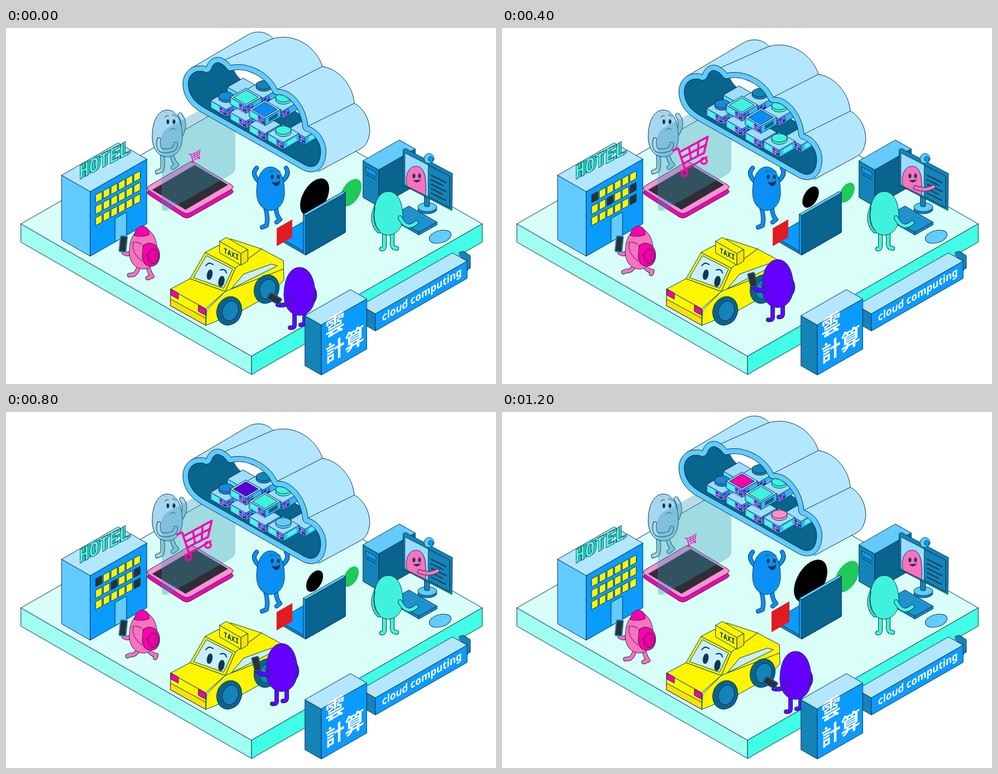
An HTML page for the animation above (1.4 s loop, 878 by 638 pixels).

```html
<!DOCTYPE html>
<html lang="en">
<head>
<meta charset="utf-8">
<title>Cloud computing</title>
<style>
html, body { margin: 0; width: 100%; height: 100%; overflow: hidden; background: #fff; }
svg { display: block; width: 878px; height: 638px; }
</style>
</head>
<body>
<svg id="stage" viewBox="0 0 878 638" stroke-linejoin="round" stroke-linecap="round"></svg>
<script>
const INK = '#063a52', SKY = '#b3e6ff', AQUA = '#62cbff', BLUE = '#0a9bff', MID = '#1583b8',
  DEEP = '#09648e', MINT = '#40ffe6', TEAL = '#40f2dd', HOT = '#ff00aa', PINK = '#ff70bf',
  VIOLET = '#6400ff', YELLOW = '#fff500', GOLD = '#ffe000', DARK = '#302e33',
  MONO = "'DejaVu Sans Mono', monospace", SLOPE = .574;

// drawing helpers
const path = (d, fill = 'none', more = '') => `<path d="${d}" fill="${fill}" stroke="${INK}" ${more}/>`;
const poly = (pts, fill) => `<polygon points="${pts}" fill="${fill}" stroke="${INK}"/>`;
const oval = (x, y, rx, ry, fill, turn = 0) =>
  `<ellipse rx="${rx}" ry="${ry}" transform="translate(${x} ${y}) rotate(${turn})" fill="${fill}" stroke="${INK}"/>`;
const bare = (x, y, w, h, fill) => `<rect x="${x}" y="${y}" width="${w}" height="${h}" fill="${fill}"/>`;
const group = (inner, more = '') => `<g ${more}>${inner}</g>`;
const iso = (x, y, inner, slope = -.51, wide = .87) =>
  group(inner, `transform="matrix(${wide} ${slope} 0 1 ${x} ${y})"`);
const limb = (d, color, id = '', w = 6) =>
  `<path class="${id}" d="${d}" fill="none" stroke="${INK}" stroke-width="${w + 2}"/>` +
  `<path class="${id}" d="${d}" fill="none" stroke="${color}" stroke-width="${w}"/>`;
const egg = (x, y, rx, ry, fill) => path(
  `M${x - rx},${y + ry * .15} C${x - rx},${y - ry * .55} ${x - rx * .6},${y - ry} ${x},${y - ry}` +
  ` S${x + rx},${y - ry * .55} ${x + rx},${y + ry * .15} C${x + rx},${y + ry * .72} ${x + rx * .5},${y + ry} ${x},${y + ry}` +
  ` S${x - rx},${y + ry * .72} ${x - rx},${y + ry * .15}Z`, fill);
const eyes = (x, y, gap) => oval(x, y, 2, 4, INK) + oval(x + gap, y, 2, 4, INK);

// isometric block: x,y is the front top corner, a and b its reach left and right
function block(x, y, a, b, h, top, left, right) {
  const l = `${x - a},${y - a * SLOPE}`, r = `${x + b},${y - b * SLOPE}`;
  return path(`M${l} L${x},${y} v${h} l${-a},${-a * SLOPE}Z`, left) +
    path(`M${r} L${x},${y} v${h} l${b},${-b * SLOPE}Z`, right) +
    poly(`${l} ${x + b - a},${y - (a + b) * SLOPE} ${r} ${x},${y}`, top);
}

function server(x, y, top = '', panel = '') {
  const chips = (x0, w) => bare(x0, 2, w, 4, VIOLET) + bare(x0 + w + 1, 7, w, 4, '#2a1a9a') +
    bare(x0, 7, w, 4, HOT) + bare(x0 + w + 1, 2, w, 4, MID);
  return block(x, y + 16, 28, 28, 13, '#9edcff', AQUA, '#3eb2f5') +
    iso(x - 28, y, bare(3, 3, 11, 7, MINT) + chips(16, 5), SLOPE, 1) +
    iso(x, y + 16, panel ? bare(7, 3, 16, 7, panel) : chips(2, 5), -SLOPE, 1) + top;
}
const disc = (x, y, fill, id = '') =>
  path(`M${x - 14},${y} v4 a14,7.5 0 0 0 28,0 v-4Z`, fill, `class="${id}"`) +
  `<ellipse class="${id}" cx="${x}" cy="${y}" rx="14" ry="7.5" fill="${fill}" stroke="${INK}"/>`;
const lid = (x, y, id) =>
  path(`M${x - 22},${y} l22,-13 l22,13 l-22,13Z`, TEAL, `class="${id}"`);

function cloud() {
  const rim = 'M317,100 C317,80 332,68 346,68 Q355,67 359,70 C364,54 378,49 389,55 Q397,59 403,67' +
    ' C432,60 472,78 486,110 C512,108 538,140 541,176 C562,182 576,206 573,228 C571,246 562,258 546,258' +
    ' Q538,258 530,253 L352,152 C330,140 317,122 317,100Z';
  const hull = 'M332,72 L432,13 C450,2 470,8 478,19 C518,8 556,34 567,69 C598,74 622,104 624,135' +
    ' C646,146 656,176 650,196 C647,207 643,212 636,216 L560,257 L345,90Z';
  const ring = (color, w) => `<path d="${rim}" fill="none" stroke="${color}" stroke-width="${w}"/>`;
  const racks = server(425, 106) + server(460, 110, disc(462, 102, MID)) +
    server(495, 133, disc(497, 125, TEAL)) + server(395, 130, disc(395, 122, '#1d86d8')) +
    server(536, 180, '', MINT) + server(430, 151) + server(430, 124, lid(430, 124, 'lidA')) +
    server(464, 173) + server(464, 146, lid(464, 146, 'lidB'), DEEP) +
    server(497, 189, disc(497, 183, TEAL, 'lidC'), MINT);
  return group(path(hull, SKY) +
    path('M392,57 L478,19 M486,110 L567,69 M541,176 L624,135') +
    `<clipPath id="rim"><path d="${rim}"/></clipPath>` +
    group(`<path d="${rim}" fill="${DEEP}"/>` +
      `<path d="${rim}" transform="translate(79 -42)" fill="#fff" stroke="${DEEP}" stroke-width="18"/>` +
      racks + ring(INK, 20) + ring(AQUA, 18), 'clip-path="url(#rim)"') +
    path(rim), 'class="cloud"');
}

function hotel() {
  let s = block(151, 293, 51, 101, 116, SKY, AQUA, BLUE) + poly('196,341 216,330 216,372 196,383', AQUA);
  for (let i = 0; i < 18; i++) {
    const c = i % 6, x = 161 + c * 13.7, y = 299 + (i - c) / 6 * 20.5 - c * 7.4;
    s += path(`M${x},${y} l11,-6 v14 l-11,6Z`, YELLOW, `class="win${i}"`);
  }
  for (let k = 4; k >= 0; k--) {
    s += iso(131 + k, 272 - k * .7, `<text font-family="${MONO}" font-weight="700" font-size="34" fill="${k ? '#38d8c6' : '#5cffe4'}"` +
      ` stroke="${k % 4 ? 'none' : INK}">HOTEL</text>`, -.45, .87);
  }
  return s;
}

function shopper() {
  const c = '#a6d6f0';
  return limb('M314,190 Q323,172 312,156', c, 'shopArm', 7) +
    limb('M279,222 Q283,244 279,255 L271,258', c) + limb('M296,222 Q299,240 306,245 L299,250', c) +
    egg(289, 189, 27, 42, c) + eyes(290, 168, 11) +
    path('M284,160 q4,-4 7,-3 M298,156 q5,-1 7,3 M294,183 q5,-6 10,-1') +
    limb('M274,200 Q270,223 288,220 Q304,219 304,208', c);
}

function tablet() {
  const slab = (y, fill) => path(`M256,${y + 283} L328,${y + 241} q5,-3 10,0 L404,${y + 281} q6,4 0,8 L330,${y + 331} q-6,3 -12,0 L256,${y + 291} q-6,-4 0,-8Z`, fill);
  return slab(8, HOT) + slab(0, '#ff8fd2') + poly('263,290 338,246 397,281 322,325', DARK) + shopper() +
    '<path d="M279,197 Q279,186 289,180 L402,116 Q411,112 411,122 V250 Q411,258 403,263 L291,326 Q279,332 279,320Z" fill="#3698b4" fill-opacity=".35"/>' +
    `<g class="cart" fill="none" stroke="${HOT}" stroke-width="5">` +
    '<path d="M296,216 L308,211 L325,262 L376,232 M311,220 L379,183 L370,222 L319,248 M315,234 L375,202 M334,208 L339,237 M357,196 L355,229"/>' +
    '<circle cx="323" cy="270" r="7"/><circle cx="370" cy="241" r="7"/></g>';
}

function walker() {
  return limb('M238,425 Q236,438 229,442 L221,443', PINK, 'walkL') + limb('M254,424 Q256,438 262,445 L254,448', PINK, 'walkR') +
    limb('M229,393 Q224,410 211,403', PINK) + egg(246, 396, 25, 36, PINK) +
    path('M230,372 Q232,355 244,355 Q257,356 257,370 Q246,376 230,372Z', HOT) +
    path('M246,390 Q254,382 266,388 Q277,395 275,412 Q272,428 258,427 Q245,426 244,410Z', HOT) +
    path('M228,384 Q224,404 244,418 M228,384 Q240,382 247,392') + oval(264, 409, 10, 13, '#e8009c') +
    `<rect x="-6" y="-14" width="12" height="28" rx="2" transform="translate(210 387) rotate(6)" fill="${DARK}" stroke="${MID}" stroke-width="2"/>`;
}

function taxi() {
  const wheel = (x, y) => oval(x, y, 22, 26, DEEP, 20) + oval(x + 2, y, 14, 18, MID, 20);
  return poly('360,505 393,472 411,430 458,396 497,417 498,452 470,480 420,508 358,533', YELLOW) +
    poly('295,468 358,503 358,533 295,498', YELLOW) + poly('295,486 358,520 358,533 295,498', GOLD) + path('M393,472 L497,432') +
    poly('295,468 330,449 393,472 358,503', YELLOW) + poly('330,449 357,402 411,430 393,472', YELLOW) +
    poly('336,447 359,408 406,432 390,466', '#c9efff') + poly('357,402 403,378 458,396 411,430', YELLOW) +
    poly('404,467 426,441 476,423 486,426', '#c9efff') +
    poly('296,468 309,475 309,486 296,479', HOT) + poly('345,497 358,504 358,515 345,508', HOT) +
    wheel(467, 468) + wheel(400, 507) +
    block(421, 404, 38, 12, 21, YELLOW, YELLOW, GOLD) +
    iso(390, 403, `<text font-family="${MONO}" font-weight="700" font-size="13" fill="${INK}">TAXI</text>`, .42) +
    path('M358,426 q6,-8 13,-2 M384,434 q8,-4 11,5', 'none', 'stroke-width="2"') +
    oval(386, 454, 5, 9.5, INK, 12) + group(oval(365, 442, 4.5, 9, INK, 12), 'class="eye"') +
    path('M363,437 l8,6 l-8,4', 'none', 'class="wink" stroke-width="2"');
}

function caller() {
  return group(limb('M517,505 V532 q0,6 -8,5', VIOLET) + limb('M535,505 V526 q0,6 -7,6', VIOLET) +
    limb('M547,462 Q560,480 546,494', VIOLET) + egg(526, 472, 28, 43, VIOLET) +
    path('M551,478 Q552,490 544,497') + limb('M512,482 Q505,500 487,496', VIOLET, 'callArm') +
    `<rect class="phone" x="-6" y="-12" width="12" height="24" rx="2" fill="${DARK}" stroke="${DEEP}" stroke-width="2"/>`, 'class="caller"');
}

function waver() {
  const c = '#0a8ff5';
  return limb('M465,322 Q470,340 467,354 L459,357', c) + limb('M484,322 Q484,336 491,343 L485,348', c) +
    limb('', c, 'waveL') + limb('', c, 'waveR') + egg(474, 288, 25, 39, c) + eyes(477, 267, 11) +
    path('M477,276 Q484,279 491,274 Q490,283 484,283 Q479,282 477,276Z', INK) + path('M472,259 q4,-4 7,-2 M485,256 q4,-2 7,2');
}

function laptop() {
  return group('<circle r="30"/>', 'class="tokenA"') + group('<circle r="22" fill="#1fc95a"/>', 'class="tokenB"') +
    block(537, 402, 50, 71, 5, BLUE, MID, MID) + block(537, 336, 4, 71, 71, AQUA, BLUE, DEEP) +
    group(bare(-16, -16, 32, 32, '#e01b22'), 'class="tokenC"');
}

function desk() {
  const lines = [0, 1, 2, 3, 4].map(i => `M762,${264 + i * 8} l${26 - i % 2 * 6},${13 - i % 2 * 3}`).join(' ');
  return block(668, 254, 28, 65, 66, AQUA, MID, DEEP) + path('M645,249 l18,10 v8 l-18,-10Z M645,262 l18,10', BLUE) +
    block(740, 366, 50, 32, 5, '#1f90cf', MID, MID) + oval(778, 374, 20, 11, AQUA, -15) +
    oval(755, 325, 17, 8, MID) + oval(755, 321, 17, 8, AQUA) + path('M750,298 h9 v21 q-4,3 -9,0Z', MID) +
    poly('712,218 716,216 800,261 799,327 712,282', MID) + poly('715,224 795,265 795,322 715,281', '#9addff') +
    poly('757,246 795,265 795,322 757,302', MID) + path(lines, 'none', 'stroke-width="2"') +
    oval(758, 234, 9, 9, AQUA) + oval(761, 235, 4, 5, BLUE) +
    path('M718,283 C715,261 722,248 735,248 C748,248 754,262 752,300Z', PINK) +
    eyes(731, 265, 10) + path('M730,273 Q736,280 743,272', INK) + limb('', PINK, 'reach') +
    limb('M678,366 V390 q0,7 -5,6', TEAL) + limb('M692,366 V388 q0,6 8,7', TEAL) +
    limb('M666,314 Q650,345 668,364', TEAL) + egg(685, 332, 26, 39, TEAL) +
    path('M661,322 Q656,350 669,363') + limb('', TEAL, 'typeArm');
}

function signs() {
  const cjk = (t, y) => iso(572, y, `<text font-family="'Noto Sans CJK TC','Noto Sans CJK',sans-serif" font-weight="900" font-size="39" fill="#fff">${t}</text>`, -.52, .9);
  return poly('812,402 820,400 832,408 832,430 824,436', MID) +
    block(662, 512, 26, 164, 31, SKY, MID, BLUE) +
    iso(674, 526, `<text font-family="'Noto Sans','Open Sans',sans-serif" font-weight="700" font-size="19.5" fill="#fff">cloud computing</text>`) +
    block(565, 532, 29, 81, 90, SKY, MID, BLUE) + cjk('雲', 556) + cjk('計算', 602);
}

const stage = document.getElementById('stage');
stage.innerHTML = block(440, 588, 413, 413, 33, '#d9fff8', '#9ffff0', MINT) + tablet() + hotel() + waver() +
  cloud() + laptop() + desk() + walker() + taxi() + caller() + signs();

const set = (id, key, value) => stage.querySelectorAll('.' + id).forEach(el => el.setAttribute(key, value));
const see = (id, on) => set(id, 'visibility', on ? 'visible' : 'hidden');

// blends two paths of the same form
function mix(a, b, u) {
  const ends = b.match(/[\d.]+/g);
  let i = 0;
  return a.replace(/[\d.]+/g, n => +n + (ends[i++] - n) * u);
}

const STEPS = 7, HOLD = 200;
const UNLIT = [[], [1, 10, 13], [0, 8, 11, 17], [4, 6, 16]];
const LIDS = {
  lidA: [TEAL, '#5a00d2', HOT, HOT],
  lidB: ['#0a8cf5', TEAL, '#5a00d2', TEAL],
  lidC: [TEAL, AQUA, '#ff8fd2', '#ff8fd2']
};

// a token pulses with the pose and swells late in the loop
function token(id, x, y, size, swell, period, phase, step, pose) {
  const s = (size + swell * Math.cos(2 * Math.PI * pose / period + phase)) * (1 + .15 * (step / 6) ** 5);
  set(id, 'transform', `matrix(${.87 * s} ${-.5 * s} 0 ${s} ${x} ${y})`);
}

function show(step) {
  const pose = 3 - Math.abs(step - 3), u = pose / 3;
  const sway = Math.sin(pose * Math.PI / 2), run = Math.min(1, pose / 2);

  set('cloud', 'transform', `translate(0 ${14 - 7 * Math.abs(pose - 2)})`);
  set('cart', 'transform', `translate(338 230) scale(${.24 + .76 * u}) translate(-338 -230)`);
  set('shopArm', 'd', mix('M314,190 Q323,172 312,156', 'M314,189 Q327,170 316,157', u));

  set('walkL', 'd', mix('M238,425 Q236,438 229,442 L221,443', 'M238,425 Q230,436 220,432 L216,435', u));
  set('walkR', 'd', mix('M254,424 Q256,438 262,445 L254,448', 'M254,424 Q262,434 273,431 L274,437', u));

  set('waveL', 'd', `M456,278 Q${438 - 4 * sway},262 ${449 - 7 * sway},251`);
  set('waveR', 'd', `M492,276 Q${510 + 4 * sway},264 ${502 + 7 * sway},251`);

  set('caller', 'transform', `translate(${-32 * run ** 1.4} ${-14 * Math.sin(run * Math.PI / 2)})`);
  set('callArm', 'd', mix('M512,482 Q505,500 487,496', 'M507,478 Q492,486 477,469', u));
  set('phone', 'transform', `translate(${481 - 3 * sway} ${485 - 30 * u}) rotate(${68 * u - 60})`);

  see('eye', pose < 3);
  see('wink', pose === 3);
  see('reach', pose > 0);
  set('reach', 'd', `M741,286 Q758,${289 + 6 * u} 773,${270 + 22 * u}`);
  set('typeArm', 'd', `M706,340 Q718,${364 - 5 * sway} ${735 + 4 * sway},${349 - 13 * sway}`);

  token('tokenA', 553, 303, .77, .25, 3, -.43, step, pose);
  token('tokenB', 618, 295, .74, .29, 3, .47, step, pose);
  token('tokenC', 499, 367, 1, .32, 4, Math.PI / 2, step, pose);

  for (let i = 0; i < 18; i++) set('win' + i, 'fill', UNLIT[pose].includes(i) ? DARK : YELLOW);
  for (const id in LIDS) set(id, 'fill', LIDS[id][Math.max(0, step - 3)]);
}

const start = performance.now();
let shown = 0;
show(0);
function tick() {
  const step = Math.floor((performance.now() - start) / HOLD) % STEPS;
  if (step !== shown) show(shown = step);
  requestAnimationFrame(tick);
}
requestAnimationFrame(tick);
</script>
</body>
</html>
```
